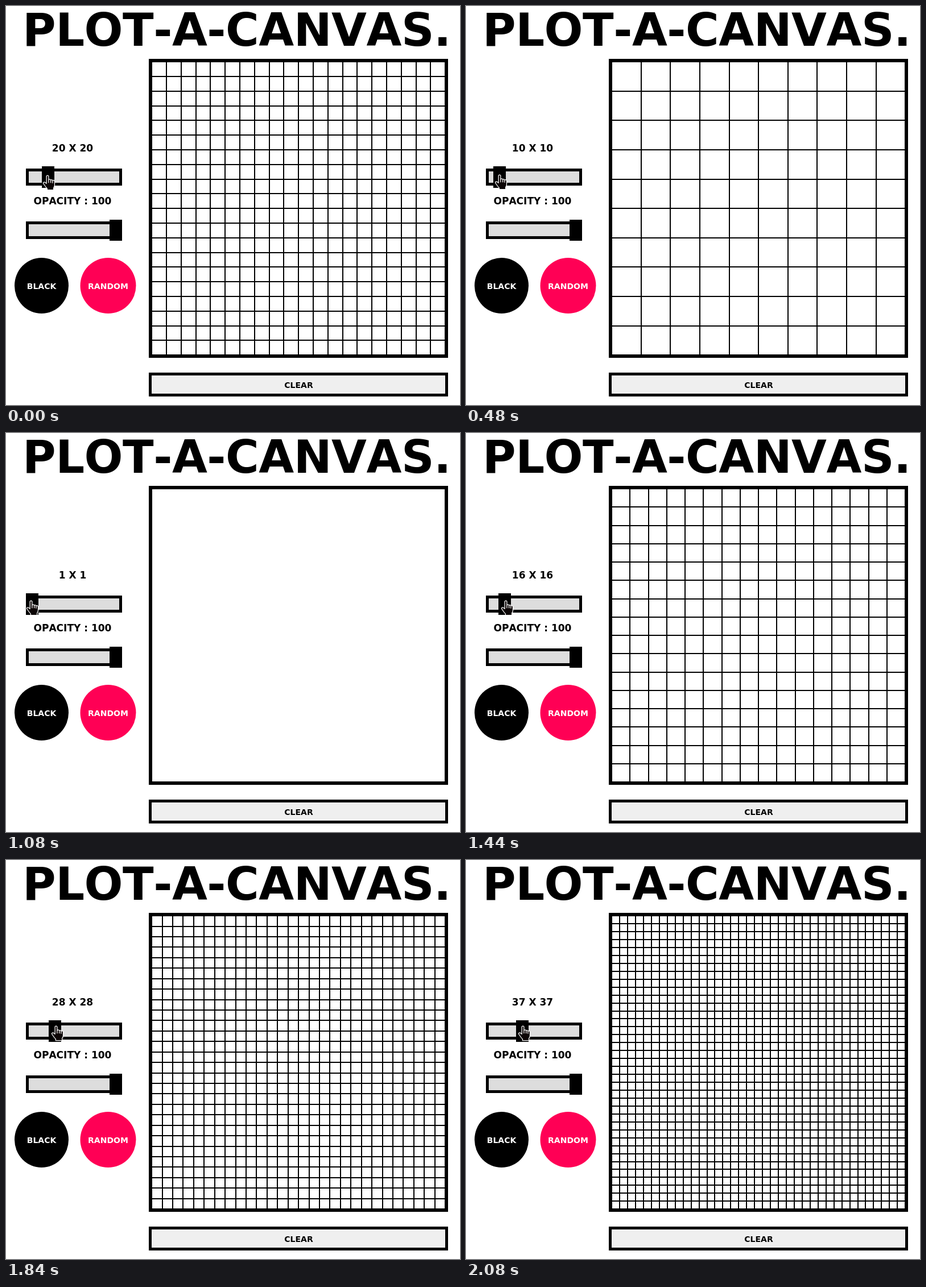
These frames come from a looping animation (798 by 702 pixels, 2.12 s). An HTML page:

```html
<!DOCTYPE html>
<html lang="en">
<head>
<meta charset="utf-8">
<title>Grid drawing pad</title>
<style>
  html, body { margin: 0; width: 100%; height: 100%; overflow: hidden; background: #fff; }
  svg { display: block; }
  text {
    font: bold 14px Verdana, "DejaVu Sans", sans-serif;
    font-kerning: none;
    text-anchor: middle;
  }
  .title { font-size: 80px; letter-spacing: -.5px; text-anchor: start; }
  .label { font-size: 17px; }
  .light { fill: #fff; }
  .box { stroke: #000; stroke-width: 5; }
  rect, #lines { shape-rendering: crispEdges; }
</style>
</head>
<body>
<svg width="798" height="702" viewBox="0 0 798 702">
  <text class="title" x="29" y="70">PLOT-A-CANVAS.</text>

  <rect x="254" y="96" width="520" height="520" fill="#fff" stroke="#000" stroke-width="6"/>
  <path id="lines"/>

  <text class="label" id="size" x="117" y="256"></text>
  <rect class="box" x="37.5" y="288.5" width="164" height="25" fill="#ddd"/>
  <rect id="thumb" y="282" width="22" height="38"/>

  <text class="label" x="117" y="349">OPACITY : 100</text>
  <rect class="box" x="37.5" y="381.5" width="164" height="25.5" fill="#ddd"/>
  <rect x="182" y="376" width="22" height="37"/>

  <ellipse cx="62.5" cy="492" rx="47.5" ry="49"/>
  <text class="light" x="62.5" y="498">BLACK</text>
  <ellipse cx="179.5" cy="492" rx="49" ry="49" fill="#ff0055"/>
  <text class="light" x="179.5" y="498">RANDOM</text>

  <rect class="box" x="253.5" y="647.5" width="521" height="37" fill="#efefef"/>
  <text x="514.5" y="672">CLEAR</text>

  <g id="hand" stroke="#fff" stroke-linejoin="round">
    <path fill="#0c0505" d="M5 12V2Q5 .5 6.5 .5T8 2V7Q8 6 9.5 6T11 7.5Q11 6.5 12.3 6.5T13.6 8Q13.6 7.3 15 7.3T16.5 9V14Q16.5 16 15 18V21H6V19Q4 17 1 12.5Q0 11 1 10.3Q2 9.7 3.3 10.5Z"/>
    <path fill="none" d="M8 7V11M11 7.5V11M13.6 8V11.5"/>
  </g>
</svg>
<script>
const LOOP = 2120, STEP = 40;
const GRID = { x: 256.2, y: 98.2, left: 256, top: 98, size: 516 };

// time, grid size, pointer x, pointer y
const keys = [
  [0, 20, 73, 298],
  [240, 16, 67, 298],
  [720, 4, 51, 296],
  [1080, 1, 44, 295],
  [1440, 16, 70, 295],
  [1840, 28, 88, 292],
  [2080, 37, 100, 292]
];

const el = id => document.getElementById(id);
const lines = el("lines"), size = el("size"), thumb = el("thumb"), hand = el("hand");

const secant = (i, col) =>
  (keys[i + 1][col] - keys[i][col]) / (keys[i + 1][0] - keys[i][0]);

// Slope that never overshoots the neighbouring keys
function slope(i, col) {
  if (i === 0) return secant(0, col);
  if (i === keys.length - 1) return secant(i - 1, col);
  const a = secant(i - 1, col), b = secant(i, col);
  return a * b <= 0 ? 0 : 2 * a * b / (a + b);
}

function valueAt(t, col) {
  let i = 0;
  while (i < keys.length - 2 && t >= keys[i + 1][0]) i++;
  const [p, q] = [keys[i], keys[i + 1]];
  const span = q[0] - p[0], u = (t - p[0]) / span, v = 1 - u;
  return v * v * (1 + 2 * u) * p[col] + u * u * (3 - 2 * u) * q[col]
    + span * u * v * (v * slope(i, col) - u * slope(i + 1, col));
}

function gridPath(n) {
  const { x, y, left, top, size } = GRID;
  let d = "";
  for (let k = 1; k < n; k++) {
    const off = k * size / n;
    d += `M${Math.round(x + off) - 1} ${top}h2v${size}h-2z`;
    d += `M${left} ${Math.round(y + off) - 1}h${size}v2h-${size}z`;
  }
  return d;
}

let shown = 0;

function draw(t) {
  const n = Math.round(valueAt(t, 1));
  if (n !== shown) {
    shown = n;
    lines.setAttribute("d", gridPath(n));
    size.textContent = `${n} X ${n}`;
    thumb.setAttribute("x", Math.floor(35 + (n - 1) / 99 * 147));
  }
  const x = Math.round(valueAt(t, 2)), y = Math.round(valueAt(t, 3));
  hand.setAttribute("transform", `translate(${x} ${y}) scale(1.25) translate(-6.5 -.5)`);
}

const start = performance.now();

function tick() {
  const t = (performance.now() - start) % LOOP;
  draw(Math.floor(t / STEP) * STEP);
  requestAnimationFrame(tick);
}

draw(0);
requestAnimationFrame(tick);
</script>
</body>
</html>
```
